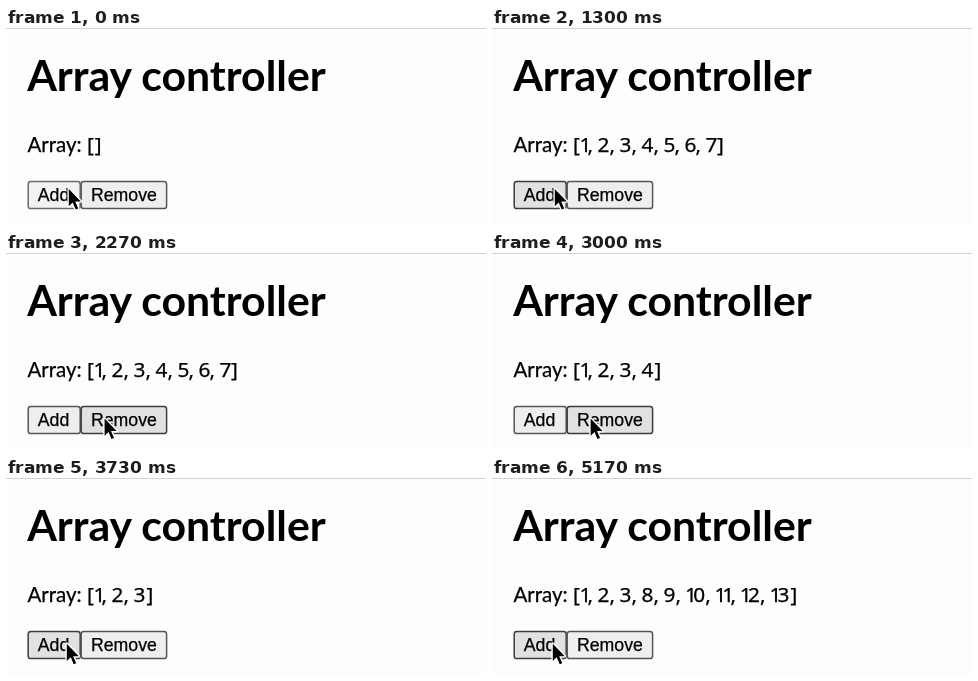
Animation of 480x197 px, one loop 5.33 s. Source, as an HTML page:

```html
<!DOCTYPE html>
<html lang="en">
<head>
<meta charset="utf-8">
<title>Array controller</title>
<style>
  html, body { margin: 0; width: 100%; height: 100%; overflow: hidden; background: #fefdfe; }
  svg { display: block; width: 100%; height: 100%; }
  .body { font-size: 20.5px; }
  .latin { font-family: Lato, sans-serif; }
  .list { font-family: "Noto Sans", "Open Sans", sans-serif; font-size: 20.8px; white-space: pre; }
  .body, .list, .button text { stroke: #000; stroke-width: .25; }
  .button text { font: 17.7px "Liberation Sans", Arial, sans-serif; }
  .button rect { stroke-width: 1.5; }
</style>
</head>
<body>
<svg viewBox="0 0 480 197">
  <rect width="480" height="197" fill="#fefdfe"/>
  <rect width="480" height="1" fill="#d2d2d4"/>
  <text class="latin" y="63" font-size="42.8" font-weight="700"><tspan x="21.2">Array</tspan> <tspan x="135.2">controller</tspan></text>
  <text class="latin body" x="21.5" y="124.3">Array:</text>
  <text class="list" id="list" y="124.3"></text>
  <g class="button" id="add">
    <rect x="22.2" y="153.6" width="52" height="27" rx="2.6"/>
    <text x="31.8" y="173">Add</text>
  </g>
  <g class="button" id="remove">
    <rect x="75.2" y="153.6" width="85.4" height="27" rx="2.6"/>
    <text x="85" y="173">Remove</text>
  </g>
  <path id="cursor" d="M0 0V17.2L3.9 13.5L6.9 20.4L9.4 19.4L6.4 12.4H12Z" stroke="#fff" stroke-width="2.8" stroke-linejoin="round" paint-order="stroke"/>
</svg>
<script>
const LOOP = 5330;
const $ = id => document.getElementById(id);
const list = $('list'), cursor = $('cursor');

// Each click: mouse down, mouse up. The list changes on mouse up.
const clicks = [
  ['add', 0, 100], ['add', 200, 300], ['add', 400, 500], ['add', 600, 670],
  ['add', 770, 870], ['add', 970, 1070], ['add', 1200, 1300],
  ['remove', 2470, 2600], ['remove', 2700, 2800], ['remove', 2900, 3000], ['remove', 3100, 3200],
  ['add', 3870, 3970], ['add', 4130, 4200], ['add', 4330, 4400],
  ['add', 4570, 4630], ['add', 4830, 4900], ['add', 5070, 5170]
];

const moves = [
  { from: [62.8, 161], to: [98.6, 165.6], start: 1900, end: 2270 },
  { from: [98.6, 165.6], to: [60.8, 165.8], start: 3467, end: 3730 }
];

const looks = {
  idle: ['#efeeef', '#555'],
  hover: ['#e2e0e3', '#3c3c3c'],
  active: ['#f3f2f3', '#6a6a6a']
};

function itemsAt(t) {
  const items = [];
  let next = 1;
  for (const [name, , up] of clicks) {
    if (t < up) break;
    if (name === 'add') items.push(next++);
    else items.pop();
  }
  return items;
}

function advance(ch) {
  if (ch === '[') return 7;
  if (ch === '1') return 7.6;
  if (ch === ',' || ch === ' ') return 5;
  return '567'.includes(ch) ? 10.9 : 12;
}

function drawList(items) {
  const text = '[' + items.join(', ') + ']';
  if (list.textContent === text) return;
  let pen = 81;
  const xs = [...text].map(ch => {
    const x = pen + (ch === '1' ? -0.6 : ch === ']' ? 0.8 : 0);
    pen += advance(ch);
    return x.toFixed(1);
  });
  list.setAttribute('x', xs.join(' '));
  list.textContent = text;
}

function cursorAt(t) {
  let pos = moves[0].from;
  for (const { from, to, start, end } of moves) {
    if (t < start) break;
    const p = Math.min(1, (t - start) / (end - start));
    const k = p * p * (3 - 2 * p);
    pos = from.map((v, i) => v + (to[i] - v) * k);
  }
  return pos;
}

function drawButton(name, look) {
  const rect = $(name).firstElementChild;
  rect.setAttribute('fill', looks[look][0]);
  rect.setAttribute('stroke', looks[look][1]);
}

function draw(t) {
  const [x, y] = cursorAt(t);
  const over = x < 74.7 ? 'add' : 'remove';
  const pressed = clicks.some(([, down, up]) => t >= down && t < up);
  for (const name of ['add', 'remove']) {
    drawButton(name, name !== over ? 'idle' : pressed ? 'active' : 'hover');
  }
  drawList(itemsAt(t));
  cursor.setAttribute('transform', `translate(${x.toFixed(2)} ${y.toFixed(2)})`);
}

const began = performance.now();
function tick() {
  draw((performance.now() - began) % LOOP);
  requestAnimationFrame(tick);
}
tick();
</script>
</body>
</html>
```
